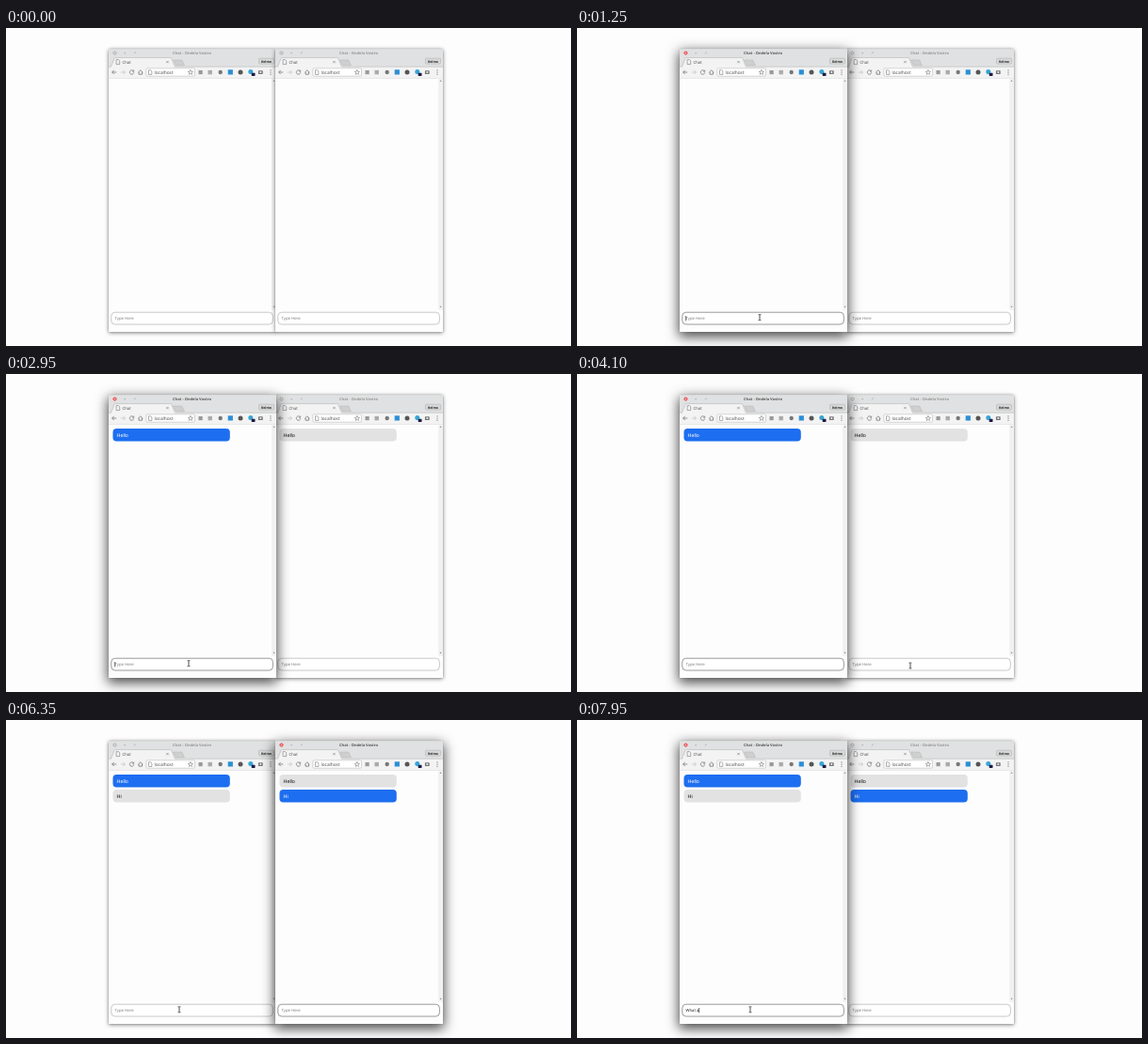
Write an HTML page that moves like this. It is 600 by 338 pixels and loops after 8000 ms.

```html
<!DOCTYPE html>
<html lang="en">
<head>
<meta charset="utf-8">
<title>Chat</title>
<style>
html, body { margin: 0; width: 100%; height: 100%; overflow: hidden; background: #fdfdfd; }
#stage { position: relative; width: 600px; height: 338px; overflow: hidden; }
.win { position: absolute; top: 22px; width: 178px; height: 301px; border-radius: 2px 2px 0 0; }
.win svg, #mouse { position: absolute; left: 0; top: 0; width: 100%; height: 100%; display: block; }
.win svg { border-radius: 2px 2px 0 0; }
#mouse { z-index: 3; }
text { font-family: "Open Sans", "Noto Sans", sans-serif; text-rendering: geometricPrecision; white-space: pre; }
.msg text { font: 5.4px "Liberation Sans", Arial, sans-serif; }
.line { fill: none; stroke: #777; stroke-width: .8; }
</style>
</head>
<body>
<div id="stage">
  <svg id="mouse" viewBox="0 0 600 338">
    <path id="beam" d="M-1.4-3H-.4L0-2.6L.4-3H1.4M0-2.6V2.6M-1.4 3H-.4L0 2.6L.4 3H1.4" fill="none" stroke="#222" stroke-width=".8"/>
    <path id="arrow" d="M0 0V6L1.4 4.7L2.3 6.7L3.2 6.3L2.3 4.4H4.2Z" fill="#111" stroke="#fff" stroke-width=".4"/>
  </svg>
</div>
<script>
const LOOP = 8000, FADE = 200, BLINK = 600;
const stage = document.getElementById('stage');
const $ = id => document.getElementById(id);

const message = (y, words) => `<g class="msg" visibility="hidden">
  <rect x="113" y="${y}" width="124.3" height="13.6" rx="4"/><text x="117" y="${y + 8.7}">${words}</text></g>`;

const page = `<svg viewBox="108.5 22 178 301">
  <rect x="108" y="22" width="179" height="301" fill="#fdfdfd"/>
  <rect x="108" y="22" width="179" height="19.2" fill="#e0e1e2"/>
  <path d="M108 22.3H287" stroke="#d0d0d0" stroke-width=".6"/>
  <circle class="close" cx="115" cy="26.6" r="2.1"/>
  <path class="cross" d="M114.2 25.8L115.8 27.4M115.8 25.8L114.2 27.4" stroke="#fff" stroke-width=".5"/>
  <path d="M124.8 26.7H126.6M135.4 27.3L137.2 25.6" stroke="#999" stroke-width=".7"/>
  <text class="title" x="197" y="28.1" font-size="4" font-weight="700" text-anchor="middle">Chat - Ondela Vastro</text>

  <path d="M108 41.2H111L114.6 32.2Q114.9 31.6 115.6 31.6H174.2Q175 31.6 175.2 32.2L179 41.2H287V53.4H108Z" fill="#f3f3f4"/>
  <path d="M108 41.2H111L114.6 32.2Q114.9 31.6 115.6 31.6H174.2Q175 31.6 175.2 32.2L179 41.2H287" fill="none" stroke="#b4b4b4" stroke-width=".6"/>
  <path d="M177.2 34H186.2L189 39.8H180Z" fill="#cfcfcf" stroke="#b5b5b5" stroke-width=".5"/>
  <path class="line" d="M116.6 33.6H119L120.2 34.8V38.6H116.6Z" style="stroke-width:.6"/>
  <text x="123" y="37.7" font-size="4.3" fill="#444">Chat</text>
  <path class="line" d="M169.8 34.9L172.2 37.3M172.2 34.9L169.8 37.3" style="stroke-width:.6"/>
  <rect x="268" y="32.2" width="16" height="5.9" rx="1" fill="#d8d8d8" stroke="#aaa" stroke-width=".5"/>
  <text x="276" y="36.6" font-size="3.5" font-weight="700" fill="#222" text-anchor="middle">Kelmo</text>

  <path class="line" d="M116.8 47H112.2M114.2 44.9L112.1 47L114.2 49.1"/>
  <path class="line" d="M121.4 47H126M124 44.9L126.1 47L124 49.1" style="stroke:#c4c4c4"/>
  <path class="line" d="M134.7 45.6A2.2 2.2 0 1 0 135.2 47.4M135.2 44.7V46.2H133.6"/>
  <path class="line" d="M139.8 47.2L142.3 44.8L144.8 47.2M140.6 46.8V49.2H144V46.8"/>
  <rect x="148.4" y="42.8" width="51.6" height="8.4" rx="1.2" fill="#fff" stroke="#bbb" stroke-width=".6"/>
  <path class="line" d="M151 44.8H153.2L154.4 46V49.4H151Z" style="stroke-width:.6"/>
  <text x="157" y="48.6" font-size="4.8" fill="#444">localhost</text>
  <path class="line" d="M195.4 44.4L196.1 46.2L198 46.3L196.5 47.5L197 49.4L195.4 48.3L193.8 49.4L194.3 47.5L192.8 46.3L194.7 46.2Z" style="stroke-width:.6"/>
  <rect x="204" y="45" width="4.2" height="4.2" fill="#999"/>
  <rect x="214" y="44.9" width="4.4" height="4.4" fill="#aaa"/>
  <circle cx="227.2" cy="47" r="2.2" fill="#777"/>
  <rect x="235.2" y="44.3" width="5.2" height="5.2" fill="#2b8fd6"/>
  <circle cx="248.5" cy="47" r="2.5" fill="#555"/>
  <circle cx="259.3" cy="46.6" r="2.5" fill="#35a5d5"/>
  <rect x="260.2" y="47.7" width="3.8" height="3.3" rx=".4" fill="#1c1c45"/>
  <rect x="267.4" y="45.2" width="4.8" height="3.8" rx=".6" fill="#777"/>
  <circle cx="269.8" cy="47.1" r="1" fill="#eee"/>
  <path d="M280.5 44.4V49.9" stroke="#666" stroke-width="1" stroke-dasharray="1 1.2"/>
  <path d="M108 53.4H287" stroke="#d2d2d2" stroke-width=".5"/>

  <rect x="281.6" y="53.7" width="4.9" height="246" fill="#f1f1f1"/>
  <path d="M283 56.8L284.1 55.3L285.2 56.8ZM283 295.8L284.1 297.3L285.2 295.8Z" fill="#888"/>
  ${message(58, 'Hello')}${message(74, 'Hi')}
  <rect class="field" x="111.3" y="302.2" width="171.6" height="12.8" rx="4" fill="#fff" stroke-width=".8"/>
  <text class="entry" x="115" y="310.1" font-size="4.27"></text>
  <path class="caret" d="M0 306V311.3" stroke="#000" stroke-width=".6"/>
</svg>`;

const makeWindow = (left, sent) => {
  const box = document.createElement('div');
  box.className = 'win';
  box.style.left = left + 'px';
  box.innerHTML = page;
  stage.append(box);
  const part = name => box.querySelector('.' + name);
  const messages = [...box.querySelectorAll('.msg')];
  messages.forEach((m, i) => {
    m.children[0].setAttribute('fill', i === sent ? '#1d6ef0' : '#e2e2e3');
    m.children[1].setAttribute('fill', i === sent ? '#fff' : '#111');
  });
  return { box, messages, close: part('close'), cross: part('cross'), title: part('title'),
    field: part('field'), entry: part('entry'), caret: part('caret') };
};
const left = makeWindow(108.5, 0), right = makeWindow(286.3, 1);

// Each entry is [time, text]; the caret blink restarts at every entry, null hides it.
const leftTyping = [[1250, ''], [2150, 'H'], [2300, 'He'], [2500, 'Hel'], [2650, 'Hell'], [2850, 'Hello'],
  [2950, ''], [4150, null], [6400, ''], [7400, 'Wh'], [7500, 'Wha'], [7750, 'What'], [7850, 'What '], [7950, 'What a']];
const rightTyping = [[4150, ''], [4750, 'H'], [5050, 'Hi'], [5250, ''], [6400, null]];
const sendTimes = [2950, 5250];

const moves = [
  { from: 150, to: 1200, a: [89, 334], b: [194, 307.6] },
  { from: 3550, to: 4100, a: [194, 307.6], b: [354, 310] },
  { from: 5800, to: 6350, a: [354, 310], b: [184, 307.8] },
];

const ramp = (t, start, length) => Math.min(1, Math.max(0, (t - start) / length));
const ease = x => x * x * (3 - 2 * x);
const mix = (a, b, k) => a + (b - a) * k;
const gray = v => `rgb(${v},${v},${v})`;

function drawWindow(w, t, active, typing) {
  w.box.style.zIndex = active >= .5 ? 2 : 1;
  w.box.style.boxShadow = `0 ${mix(1, 4, active)}px ${mix(4, 13, active)}px ${active}px rgba(0,0,0,${mix(.5, .72, active)}), 0 0 1px rgba(0,0,0,.45)`;
  w.close.setAttribute('fill', `rgb(${mix(185, 232, active)},${mix(185, 88, active)},${mix(185, 88, active)})`);
  w.title.setAttribute('fill', gray(mix(150, 85, active)));
  w.field.setAttribute('stroke', gray(mix(188, 128, active)));
  w.messages.forEach((m, i) => m.setAttribute('visibility', t >= sendTimes[i] ? 'visible' : 'hidden'));

  const [since, words] = typing.filter(step => step[0] <= t).pop() || [0, null];
  w.entry.textContent = words || 'Type Here';
  w.entry.setAttribute('fill', words ? '#111' : '#777');
  const lit = words !== null && Math.floor((t - since) / BLINK) % 2 === 0;
  w.caret.setAttribute('visibility', lit ? 'visible' : 'hidden');
  w.caret.setAttribute('transform', `translate(${115.2 + (words ? w.entry.getComputedTextLength() : 0)})`);
}

function drawMouse(t) {
  const move = moves.filter(m => m.from <= t).pop();
  $('mouse').style.display = move ? 'block' : 'none';
  if (!move) return;
  const k = ease(ramp(t, move.from, move.to - move.from));
  const x = mix(move.a[0], move.b[0], k), y = mix(move.a[1], move.b[1], k);
  const inField = y > 302 && y < 315 && (x > 111 && x < 283 || x > 289 && x < 461);
  $('beam').style.display = inField ? '' : 'none';
  $('arrow').style.display = inField ? 'none' : '';
  $('beam').setAttribute('transform', `translate(${x} ${y})`);
  $('arrow').setAttribute('transform', `translate(${x} ${y})`);
}

function frame(now) {
  const t = now % LOOP;
  const toRight = ramp(t, 4150, FADE), toLeft = ramp(t, 6400, FADE);
  drawWindow(left, t, ramp(t, 750, FADE) - toRight + toLeft, leftTyping);
  drawWindow(right, t, toRight - toLeft, rightTyping);
  drawMouse(t);
  requestAnimationFrame(frame);
}
frame(0);
</script>
</body>
</html>
```
